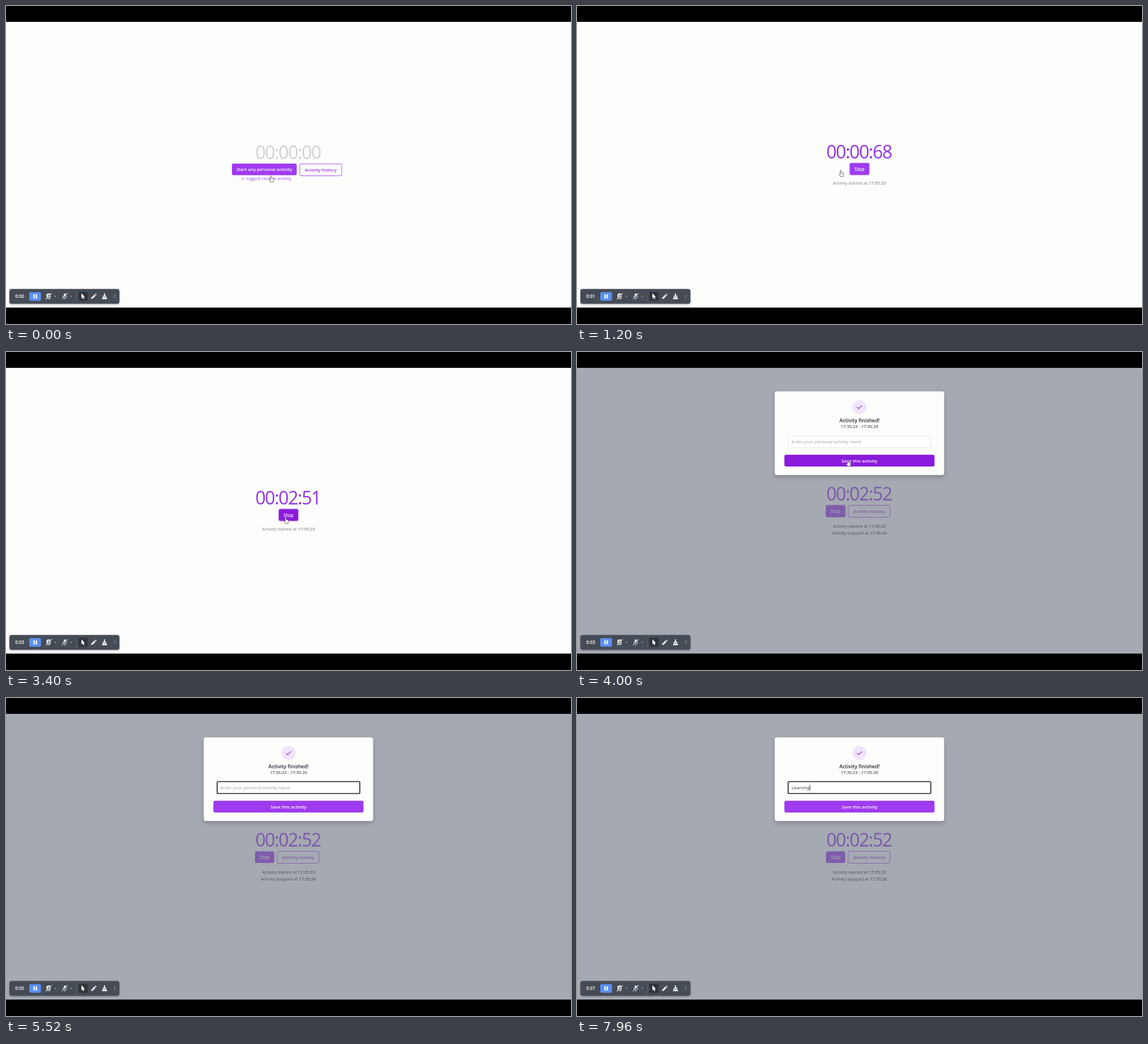
Animation, 998 px wide and 561 px high, one loop 8000 ms. Source, as an HTML page with a canvas:

```html
<!DOCTYPE html>
<html lang="en">
<head>
<meta charset="utf-8">
<title>Activity timer</title>
<style>
html, body { margin: 0; width: 100%; height: 100%; overflow: hidden; background: #000; }
canvas { display: block; }
</style>
</head>
<body>
<canvas id="stage" width="998" height="561"></canvas>
<script>
const ctx = document.getElementById('stage').getContext('2d');
const LOOP = 8000, START = 470, STOP = 3640, FOCUS = 4720;
const TYPE_AT = 6100, TYPE_STEP = 200, WORD = 'Learning';
const FONT = '"Open Sans", "Noto Sans", sans-serif';
const PURPLE = '#9333ea', FILL = '#9f3bef', HOVER = '#8a1bdc', PAGE = '#fdfdfc';
const TOP = 28, HEIGHT = 504;

// [time, value...] keys
const POINTER = [
  [0, 468, 299.5], [80, 468, 299.5], [360, 466, 290], [2750, 466, 290],
  [3150, 494, 291.5], [3660, 494, 291.5], [3960, 478.5, 190.5],
  [4400, 478.5, 190.5], [4700, 482, 155], [LOOP, 482, 155]
];
const COUNT = [[START, 0], [1200, 68], [2200, 161], [3400, 251], [STOP, 251]];

const clamp = v => Math.max(0, Math.min(1, v));
const smooth = v => v * v * (3 - 2 * v);
const linear = v => v;

function sample(keys, t, ease) {
  let i = 0;
  while (i < keys.length - 2 && t >= keys[i + 1][0]) i++;
  const a = keys[i], b = keys[i + 1];
  const k = ease(clamp((t - a[0]) / (b[0] - a[0])));
  return a.slice(1).map((v, n) => v + (b[n + 1] - v) * k);
}

function box(x, y, w, h, r, fill, stroke, line = 1) {
  ctx.beginPath();
  ctx.roundRect(x, y, w, h, r);
  if (fill) { ctx.fillStyle = fill; ctx.fill(); }
  if (stroke) { ctx.strokeStyle = stroke; ctx.lineWidth = line; ctx.stroke(); }
}

function text(str, x, y, size, color, weight = 400, align = 'center') {
  ctx.font = `${weight} ${size}px ${FONT}`;
  ctx.textAlign = align;
  ctx.fillStyle = color;
  ctx.fillText(str, x, y);
  return ctx.measureText(str).width;
}

function lines(color, width, ...paths) {
  ctx.strokeStyle = color;
  ctx.lineWidth = width;
  ctx.beginPath();
  for (const p of paths) {
    ctx.moveTo(p[0], p[1]);
    for (let i = 2; i < p.length; i += 2) ctx.lineTo(p[i], p[i + 1]);
  }
  ctx.stroke();
}

function polygon(color, p) {
  ctx.fillStyle = color;
  ctx.beginPath();
  for (let i = 0; i < p.length; i += 2) ctx.lineTo(p[i], p[i + 1]);
  ctx.fill();
}

function shadow(color, blur, y, draw) {
  ctx.save();
  ctx.shadowColor = color;
  ctx.shadowBlur = blur;
  ctx.shadowOffsetY = y;
  draw();
  ctx.restore();
}

function clock(count, y, color) {
  const two = n => String(n).padStart(2, '0');
  ctx.letterSpacing = '-1.4px';
  text(`00:${two(Math.floor(count / 100))}:${two(count % 100)}`, 440.4, y, 32, color, 400, 'left');
  ctx.letterSpacing = '0px';
}

function stamp(label, time, x, y, color, timeColor) {
  const w = text(label + ' ', x, y, 7.6, color, 400, 'left');
  text(time, x + w, y, 7.6, timeColor, 500, 'left');
}

function historyButton(x, y) {
  box(x + 0.5, y + 0.5, 74, 21, 3, null, '#a855f0');
  text('Activity history', x + 37.5, y + 13.9, 7.85, PURPLE, 600);
}

function stopButton(x, y, fill, ring) {
  if (ring) box(x - 1, y - 1, 36, 22.5, 3.5, '#cfa6f6');
  box(x, y, 34, 20.5, 3, fill);
  text('Stop', x + 17, y + 13.2, 8, '#fff', 600);
}

function idlePage(py) {
  clock(0, 269.8, '#cdd1dc');
  box(399, 278, 114.5, 20.5, 3, py < 298 ? HOVER : FILL);
  text('Start any personal activity', 456.3, 291.3, 7.8, '#fff', 600);
  historyButton(518.5, 278);
  const w = text('...or ', 410, 306.6, 6.9, '#b98be6', 400, 'left');
  text('suggest random activity', 410 + w, 306.6, 6.9, '#b273ee', 600, 'left');
}

function runningPage(t, px) {
  clock(Math.round(sample(COUNT, t, linear)[0]), 268.8, PURPLE);
  stopButton(482, 277.3, px > 481 ? HOVER : FILL, true);
  stamp('Activity started at', '17:35:23', 452.2, 315.4, '#7e8188', '#63666e');
}

function stoppedPage(t) {
  clock(252, 261.8, PURPLE);
  stopButton(439.8, 270.4, FILL, t < FOCUS);
  historyButton(478.5, 270);
  stamp('Activity started at', '17:35:23', 452.2, 309.6, '#222', '#000');
  stamp('Activity stopped at', '17:35:26', 450, 322.2, '#222', '#000');
}

function field(t) {
  const focused = t >= FOCUS;
  if (focused) box(373, 147.5, 252, 21, 1.8, '#fff', '#1d1d20', 1.6);
  else box(373, 148, 252, 20.5, 2, '#fff', '#e3e4e8', 0.8);

  const n = Math.max(0, Math.min(WORD.length, Math.floor((t - TYPE_AT) / TYPE_STEP) + 1));
  let w = 0;
  if (n) w = text(WORD.slice(0, n), 379, 161, 7.85, '#33363d', 400, 'left');
  else text('Enter your personal activity name', 379, 161, 7.85, '#9a9ea6', 400, 'left');

  const last = n ? TYPE_AT + (n - 1) * TYPE_STEP : FOCUS + 130;
  if (focused && Math.floor((t - last) / 530) % 2 === 0) {
    ctx.fillStyle = '#222';
    ctx.fillRect(379.2 + w, 153, 0.8, 10);
  }
}

function dialog(t, py) {
  const k = 1 - (1 - clamp((t - STOP) / 300)) ** 2;
  ctx.fillStyle = `rgba(107,114,128,${0.6 * k})`;
  ctx.fillRect(0, TOP, 998, HEIGHT);

  ctx.save();
  ctx.globalAlpha = k;
  const s = 0.95 + 0.05 * k;
  ctx.translate(499, 143 + 8 * (1 - k));
  ctx.scale(s, s);
  ctx.translate(-499, -143);
  shadow('rgba(0,0,0,.2)', 9, 4, () => box(349.3, 69.5, 299.2, 147.5, 4, PAGE));
  ctx.fillStyle = '#f1e4fd';
  ctx.beginPath();
  ctx.arc(499, 97.2, 12.5, 0, 7);
  ctx.fill();
  lines('#8f2fe0', 1.2, [494.8, 97.4, 497.5, 100, 503.2, 94.3]);
  text('Activity finished!', 499, 123.6, 8.9, '#1f2430', 600);
  text('17:35:23 - 17:35:26', 499, 134.2, 7.5, '#555a64', 600);
  field(t);
  box(366.3, 181.3, 265.2, 20.8, 3, py > 181 && py < 202 ? HOVER : FILL);
  text('Save this activity', 499, 194.6, 7.9, '#fff', 600);
  ctx.restore();
}

function toolbar(t) {
  shadow('rgba(40,45,70,.45)', 3, 1, () => box(6, 499.3, 194.3, 26, 4, '#464c55'));
  const sec = Math.max(0, Math.floor((t - 100) / 1000));
  text('0:0' + sec, 24.2, 515.2, 8.1, '#fff', 600);

  box(41, 504.7, 20.8, 15.3, 3, '#5a8ff0');
  box(48.4, 508.6, 2.3, 7.4, 0.5, '#fff');
  box(52.4, 508.6, 2.3, 7.4, 0.5, '#fff');

  // camera off
  const ink = '#eef0f3';
  ctx.fillStyle = ink;
  ctx.beginPath();
  ctx.arc(75.3, 511, 4, 0, 7);
  ctx.fill();
  box(72, 515.4, 6.6, 1.4, 0.6, ink);
  ctx.fillStyle = '#464c55';
  ctx.beginPath();
  ctx.arc(75.3, 511, 1.6, 0, 7);
  ctx.fill();
  lines('#464c55', 2.2, [71, 517.4, 80.6, 507]);
  lines(ink, 1.1, [70.6, 517, 80.4, 506.8]);

  // microphone off
  box(102, 507, 3.6, 6.6, 1.8, ink);
  ctx.strokeStyle = ink;
  ctx.lineWidth = 1;
  ctx.beginPath();
  ctx.arc(103.8, 511.6, 3.6, 0, Math.PI);
  ctx.stroke();
  lines(ink, 1, [103.8, 515, 103.8, 517.4]);
  lines('#464c55', 2.2, [99.8, 517.4, 109, 507]);
  lines(ink, 1.1, [99.2, 517, 108.6, 506.8]);

  for (const x of [87, 115]) polygon('#b9bdc4', [x - 1.6, 511.6, x + 1.6, 511.6, x, 513.6]);
  lines('#5b616b', 0.8, [124.5, 503, 124.5, 522]);

  box(128, 504.3, 16.3, 16, 2.5, '#2f343b');
  polygon('#fff', [133.2, 506.8, 133.2, 516, 135.3, 514.2, 136.8, 517.4, 138.2, 516.8,
    136.8, 513.6, 139.6, 513.4]);
  // pencil
  polygon(ink, [150.4, 516.9, 150.9, 514.3, 156.1, 509.1, 158.2, 511.2, 153, 516.4]);
  polygon(ink, [156.8, 508.4, 158, 507.2, 160.1, 509.3, 158.9, 510.5]);
  // brush
  box(173, 506.8, 2, 4.6, 0.7, ink);
  polygon(ink, [171, 511, 177, 511, 177.4, 513, 170.6, 513]);
  polygon(ink, [170.4, 513.7, 177.6, 513.7, 178.6, 517.2, 169.4, 517.2]);
  lines('#a4a9b2', 0.9, [193.4, 509, 190.6, 512.3, 193.4, 515.6]);
}

function hand(x, y) {
  ctx.save();
  ctx.translate(x, y);
  ctx.beginPath();
  ctx.moveTo(-1, 6.5);
  ctx.lineTo(-1, 1);
  ctx.quadraticCurveTo(0, -0.8, 1, 1);
  ctx.lineTo(1, 4.2);
  ctx.lineTo(4, 4.8);
  ctx.quadraticCurveTo(5.3, 5.2, 5.1, 6.6);
  ctx.lineTo(4.2, 11);
  ctx.lineTo(-0.4, 11);
  ctx.lineTo(-2.9, 7.4);
  ctx.quadraticCurveTo(-3, 5.8, -1, 6.8);
  ctx.closePath();
  ctx.fillStyle = '#fff';
  ctx.fill();
  ctx.strokeStyle = '#4a4a55';
  ctx.lineWidth = 0.8;
  ctx.stroke();
  ctx.restore();
}

function draw(t) {
  const [px, py] = sample(POINTER, t, smooth);
  ctx.fillStyle = '#000';
  ctx.fillRect(0, 0, 998, 561);
  ctx.fillStyle = PAGE;
  ctx.fillRect(0, TOP, 998, HEIGHT);

  if (t < START) idlePage(py);
  else if (t < STOP) runningPage(t, px);
  else {
    stoppedPage(t);
    dialog(t, py);
  }
  toolbar(t);
  if (py > 169) hand(px, py);
}

ctx.lineJoin = ctx.lineCap = 'round';
const begin = performance.now();
function tick() {
  draw((performance.now() - begin) % LOOP);
  requestAnimationFrame(tick);
}
tick();
</script>
</body>
</html>
```
